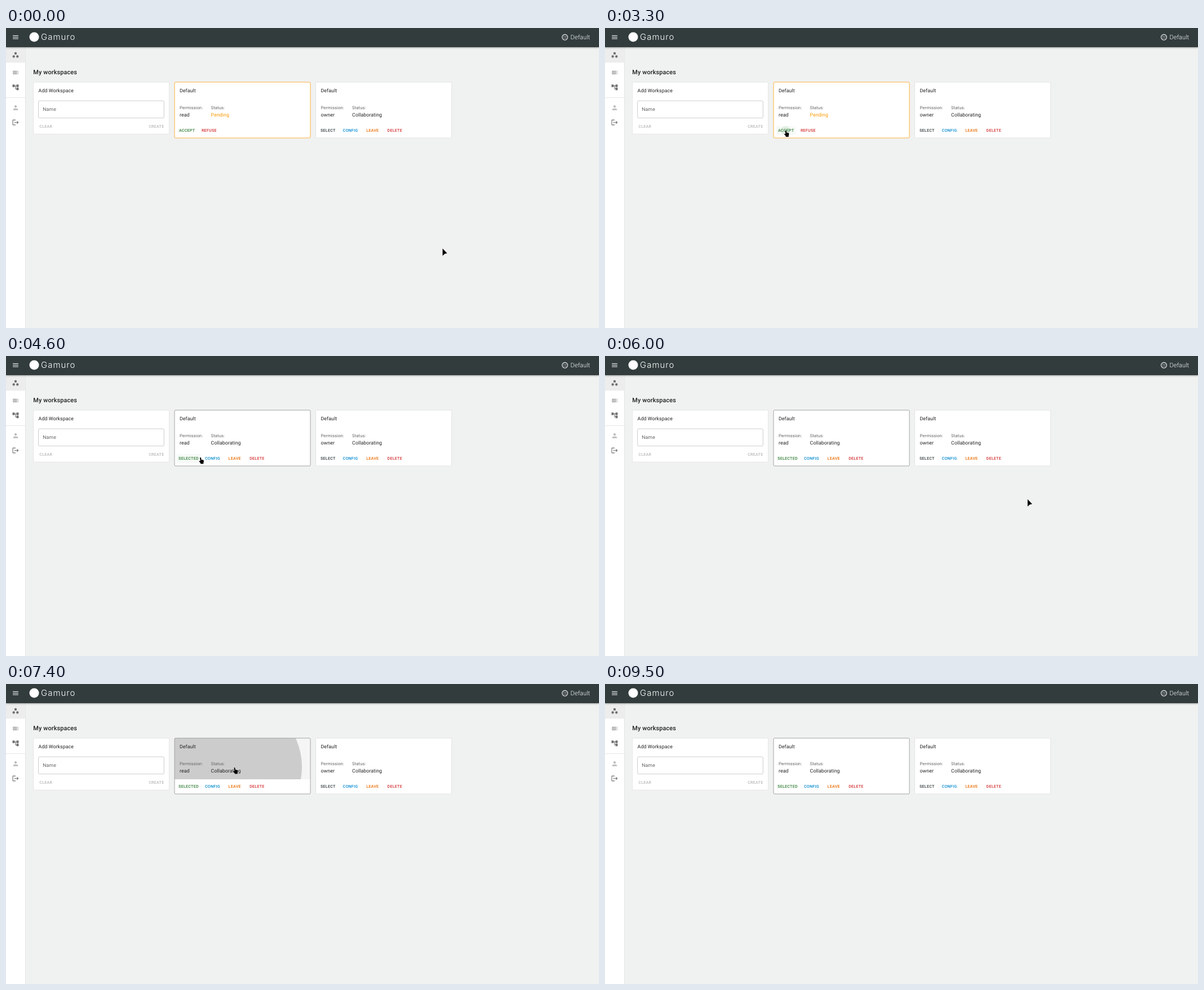
An HTML page for the animation above (9.7 s loop, 1052 by 532 pixels).

```html
<!DOCTYPE html>
<html lang="en">
<head>
<meta charset="utf-8">
<title>Workspaces</title>
<style>
  html, body { margin: 0; width: 100%; height: 100%; overflow: hidden; background: #f0f2f1; }
  svg { display: block; }
  #stage { width: 100vw; height: 100vh; }
  text { font-family: Roboto, sans-serif; font-size: 8.77px; letter-spacing: .08px; fill: #212121; text-rendering: geometricPrecision; }
  .heading { font-size: 10.96px; font-weight: 500; }
  .small { font-size: 7.67px; }
  .button { font-size: 7.12px; font-weight: 500; letter-spacing: .25px; }
  .account { font-size: 10.96px; font-weight: 300; fill: #fff; letter-spacing: 0; }
  .brand { font-family: Inter, sans-serif; font-size: 15px; font-weight: 300; fill: #fff; letter-spacing: 1px; }
  #bar { filter: drop-shadow(0 1.2px 1.6px rgba(0, 0, 0, .35)); }
</style>
</head>
<body>
<svg id="stage" viewBox="0 0 1052 532" preserveAspectRatio="none">
  <g id="frame"></g>
  <g id="content"></g>
  <g id="cursor"></g>
</svg>
<script>
const LOOP = 9700, STEP = 100;
const LOADING = [3600, 3800];
const GREEN = '#2e7d32', RED = '#d32f2f', BLUE = '#0288d1', ORANGE = '#ed6c02', DARK = '#323c3d';
const layer = id => document.getElementById(id);

// Pointer waypoints: time, x, y, eased
const path = [
  [0, 774.5, 391], [100, 774.5, 391], [1100, 309.5, 181, true], [1400, 309.5, 181],
  [1600, 326, 187.5], [1900, 360, 184.3], [2500, 360, 184.3], [2700, 312, 181.5],
  [2800, 320.5, 181.3], [4500, 320.5, 181.3], [4600, 345, 179.7], [4900, 520, 152],
  [5100, 620, 152], [5500, 750.5, 229], [5800, 757, 245], [6000, 749.7, 254],
  [6600, 749.7, 254], [7200, 405.5, 148, true], [7600, 405.5, 148], [8000, 287, 153],
  [8500, 610, 160], [9000, 610, 160], [9400, 71, 15]
];

const icons = {
  menu: 'M3 18h18v-2H3zm0-5h18v-2H3zm0-7v2h18V6z',
  groups: 'M6 13a4 4 0 1 0 0 8 4 4 0 0 0 0-8zM12 3a4 4 0 1 0 0 8 4 4 0 0 0 0-8zM18 13a4 4 0 1 0 0 8 4 4 0 0 0 0-8z',
  list: 'M3 9h14V7H3zm0 4h14v-2H3zm0 4h14v-2H3zm16 0h2v-2h-2zm0-10v2h2V7zm0 6h2v-2h-2z',
  tree: 'M22 11V3h-7v3H9V3H2v8h7V8h2v10h4v3h7v-8h-7v3h-2V8h2v3z',
  person: 'M12 12a4 4 0 1 0 0-8 4 4 0 0 0 0 8zm0 2c-2.67 0-8 1.34-8 4v2h16v-2c0-2.66-5.33-4-8-4z',
  exit: 'M17 7l-1.41 1.41L18.17 11H8v2h10.17l-2.58 2.58L17 17l5-5zM4 5h8V3H4a2 2 0 0 0-2 2v14a2 2 0 0 0 2 2h8v-2H4z',
  info: 'M11 7h2v2h-2zm0 4h2v6h-2zm1-9a10 10 0 1 0 0 20 10 10 0 0 0 0-20zm0 18a8 8 0 1 1 0-16 8 8 0 0 1 0 16z'
};

const text = (x, y, words, type = '', color = '') =>
  `<text x="${x}" y="${y}" class="${type}" style="fill:${color}">${words}</text>`;
const rect = (x, y, w, h, attrs) => `<rect x="${x}" y="${y}" width="${w}" height="${h}" ${attrs}/>`;
const icon = (name, x, y, color = '#707070', scale = .548) =>
  `<path d="${icons[name]}" fill="${color}" transform="translate(${x} ${y}) scale(${scale}) translate(-12 -12)"/>`;
const between = (t, [start, end]) => t >= start && t < end;

function pointerAt(t) {
  const i = path.findIndex(p => p[0] > t);
  if (i < 0) return path[path.length - 1].slice(1);
  if (i === 0) return path[0].slice(1);
  const [t0, x0, y0] = path[i - 1], [t1, x1, y1, eased] = path[i];
  let k = (t - t0) / (t1 - t0);
  if (eased) k = k * k * (3 - 2 * k);
  return [x0 + (x1 - x0) * k, y0 + (y1 - y0) * k];
}

// Everything clickable at a time, in screen coordinates
function targetsAt(t) {
  const dy = between(t, LOADING) ? 26.5 : 0;
  const button = (label, x, w, color) => ({ label, x, y: 174 + dy, w, h: 16, color, tx: x + 3.3 });
  const area = x => ({ x, y: 96 + dy, w: 241, h: 73, color: '#000' });
  const pending = t < LOADING[1];
  return {
    leftArea: area(299), rightArea: area(549.5),
    left: pending
      ? [button('ACCEPT', 303.6, 34.4, GREEN), button('REFUSE', 343.6, 34.4, RED)]
      : [button('SELECTED', 302.8, 43, GREEN), button('CONFIG', 349.6, 34, BLUE),
         button('LEAVE', 391.3, 30, ORANGE), button('DELETE', 428.9, 34, RED)],
    right: [button('SELECT', 554.7, 34, DARK), button('CONFIG', 594.2, 34, BLUE),
            button('LEAVE', 635.9, 30, ORANGE), button('DELETE', 673.2, 34, RED)]
  };
}

const flatten = t => Object.values(targetsAt(t)).flat();

function hit(box, t) {
  const [x, y] = pointerAt(t);
  return t < 9500 && x >= box.x && x <= box.x + box.w && y >= box.y && y <= box.y + box.h;
}

// Hover tint fades over three steps
function hoverTint(index, t) {
  let count = 0;
  for (let back = 0; back < 3; back++) {
    const box = flatten(t - back * STEP)[index];
    if (box && hit(box, t - back * STEP)) count++;
  }
  return .04 * count / 3;
}

const ripple = (box, x, y, r, alpha) =>
  `<svg x="${box.x}" y="${box.y}" width="${box.w}" height="${box.h}">` +
  `<circle cx="${x - box.x}" cy="${y - box.y}" r="${r}" fill="${box.color}" opacity="${alpha}"/></svg>`;

function card(x, dy, permission, status, statusColor, border) {
  return rect(x, 96 + dy, 241, 99, `rx="2" fill="none" stroke="${border}" stroke-width=".9"`) +
    text(x + 9, 114.3 + dy, 'Default') +
    text(x + 9, 143.8 + dy, 'Permission:', 'small', '#666') +
    text(x + 64.6, 143.8 + dy, 'Status:', 'small', '#666') +
    text(x + 9, 156.6 + dy, permission) +
    text(x + 64.6, 156.6 + dy, status, '', statusColor);
}

function drawContent(t) {
  const loading = between(t, LOADING), pending = t < LOADING[1], dy = loading ? 26.5 : 0;
  const targets = targetsAt(t), all = flatten(t);
  let out = '';
  if (loading) {
    out += rect(48.5, 96, 991.5, 26, 'rx="2" fill="#e5f6fd"') +
      icon('info', 63, 109, BLUE, .5) + text(75.6, 111.6, 'Loading your workspaces...', 'small', '#014361');
  }
  out += rect(48.5, 96 + dy, 241, 92, 'rx="2" fill="#fff" stroke="#e0e0e0" stroke-width=".8"') +
    text(57.6, 114.3 + dy, 'Add Workspace') +
    rect(57.6, 129.2 + dy, 222.8, 30.4, 'rx="2" fill="none" stroke="#c0c0c0" stroke-width=".8"') +
    text(65.2, 147.3 + dy, 'Name', '', '#666') +
    text(59.3, 177 + dy, 'CLEAR', 'button', '#b8b8b8') + text(253.2, 177 + dy, 'CREATE', 'button', '#b8b8b8');

  for (const x of [299, 549.5]) out += rect(x, 96 + dy, 241, 99, 'rx="2" fill="#fff"');
  all.forEach((box, i) => {
    const tint = hoverTint(i, t);
    if (tint) out += rect(box.x, box.y, box.w, box.h, `rx="2" fill="${box.color}" opacity="${tint}"`);
  });
  if (between(t, [3300, LOADING[1]])) {
    out += ripple(targets.left[0], 320.5, 182 + dy, 8 + (t - 3300) * .08, .1);
  }
  if (between(t, [7300, 7600])) {
    const [r, alpha] = [[50, .13], [121, .17], [150, .08]][(t - 7300) / STEP];
    out += ripple(targets.leftArea, 404, 147, r, alpha);
  }
  out += pending
    ? card(299, dy, 'read', 'Pending', '#ff9800', '#ffa726')
    : card(299, dy, 'read', 'Collaborating', '', '#9a9a9a');
  out += card(549.5, dy, 'owner', 'Collaborating', '', '#e0e0e0');
  for (const b of [...targets.left, ...targets.right]) out += text(b.tx, b.y + 10.1, b.label, 'button', b.color);
  return out;
}

function drawCursor(t) {
  if (t >= 9500) return '';
  const [x, y] = pointerAt(t);
  const shape = flatten(t).some(box => hit(box, t))
    ? 'M-1 .8Q0-.6 1 .8L1.5 4 5 4.8Q6.2 5.2 5.9 7L5.3 9.6V11.6H.2V10.3L-2.4 7.4Q-2.6 6 -1.2 6.2L-.3 6.8Z'
    : 'M0 0L8.1 8.5 3.8 9.4 0 13Z';
  return `<path d="${shape}" transform="translate(${x} ${y})" stroke="#fff" stroke-width=".7" paint-order="stroke"/>`;
}

layer('frame').innerHTML =
  rect(0, 0, 34.5, 532, 'fill="#fff"') + rect(34.2, 34, .7, 498, 'fill="#dcdcdc"') +
  rect(0, 34, 34.3, 27.5, 'fill="#ededed"') + rect(0, 123, 34.3, .7, 'fill="#dcdcdc"') +
  rect(0, 0, 1052, 34, `id="bar" fill="${DARK}"`) +
  icon('menu', 17, 16.3, '#fff') + icon('groups', 17, 47.8) + icon('list', 17, 79) +
  icon('tree', 17, 105.2) + icon('person', 17, 141.3, '#bdbdbd') + icon('exit', 17, 167.5) +
  '<circle cx="50" cy="16" r="8.5" fill="#fff"/>' + text(62, 21, 'Gamuro', 'brand') +
  '<circle cx="991.5" cy="16.3" r="4.9" fill="none" stroke="#fff" stroke-width="1.1"/>' +
  [-1.5, 1.5].map(dx => [-1.5, 1.5].map(dy =>
    `<circle cx="${991.5 + dx}" cy="${16.3 + dy}" r=".75" fill="#fff"/>`).join('')).join('') +
  text(1001.6, 20.2, 'Default', 'account') + text(48.3, 82, 'My workspaces', 'heading');

let shown = -1;
function tick() {
  const t = Math.floor(performance.now() % LOOP / STEP) * STEP;
  if (t !== shown) {
    layer('content').innerHTML = drawContent(t);
    layer('cursor').innerHTML = drawCursor(t);
    shown = t;
  }
  requestAnimationFrame(tick);
}
tick();
</script>
</body>
</html>
```
